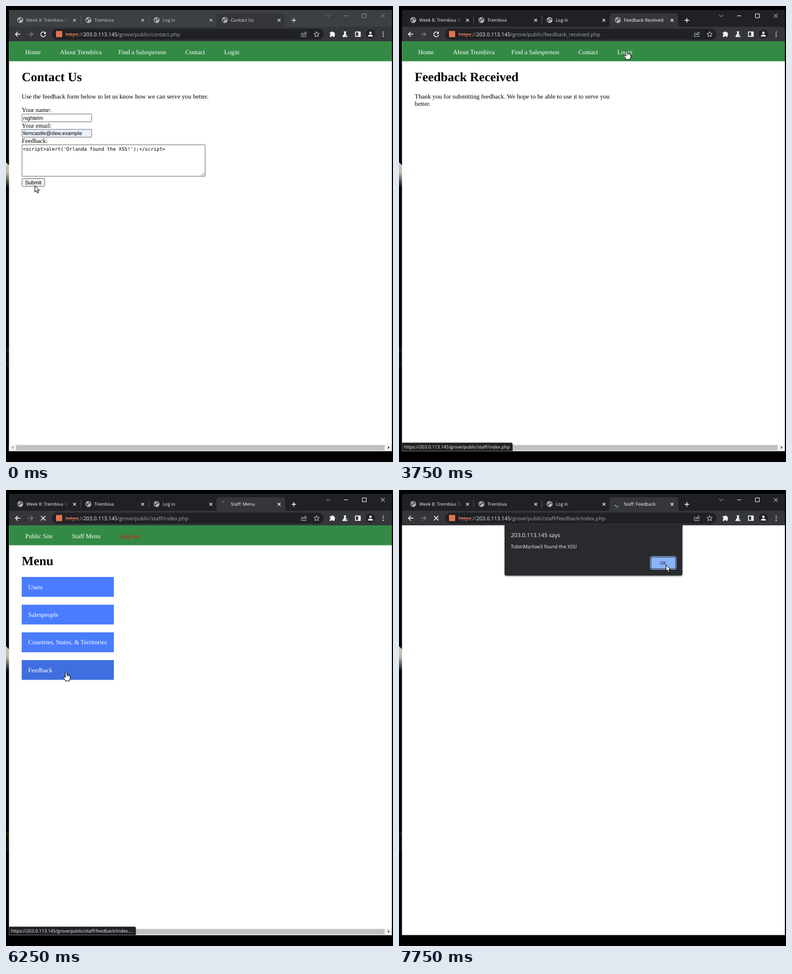
Animation of 689 by 813 pixels, one loop 8000 ms. Source, as an HTML page with a canvas:

```html
<!DOCTYPE html>
<html lang="en">
<head>
<meta charset="utf-8">
<title>Feedback form</title>
<style>
html, body { margin: 0; width: 100%; height: 100%; overflow: hidden; background: #000; }
canvas { display: block; width: 689px; height: 813px; }
</style>
</head>
<body>
<canvas id="stage" width="689" height="813"></canvas>
<script>
const ctx = document.getElementById('stage').getContext('2d');
ctx.textRendering = 'geometricPrecision';

const LOOP = 8000, STEP = 250;
const LEFT = 5.3, WIDTH = 681.7, BOTTOM = 793.4;
const SERIF = '"Liberation Serif", serif';
const SANS = '"Liberation Sans", sans-serif';
const MONO = '"DejaVu Sans Mono", monospace';
const UI = '"Open Sans", sans-serif';

const SCHEME = 'https', HOST = '203.0.113.145', ROOT = '/grove/public/';
const BRAND = 'Trembiva';

const PAGES = [
  { from: 0, title: 'Contact Us', path: 'contact.php', draw: contactPage },
  { from: 1500, title: 'Feedback Received', path: 'feedback_received.php', draw: receivedPage },
  { from: 5250, title: 'Staff: Menu', path: 'staff/index.php', draw: menuPage },
  { from: 6750, title: 'Staff: Feedback', path: 'staff/feedback/index.php', draw: alertPage },
];

// time, x, y of the pointer tip
const POINTER = [
  [0, 51, 320], [1250, 51, 320], [1500, 110, 362], [1750, 211, 402], [2000, 211, 389],
  [2250, 297, 128], [2500, 297, 128], [2750, 350, 100], [3000, 405.5, 79], [4250, 405.5, 79],
  [4500, 414, 92], [4750, 400, 150], [5000, 370, 215], [5250, 363, 225], [5500, 300, 252],
  [5750, 160, 312], [6000, 107, 324], [6500, 107, 324], [6750, 267, 248], [7000, 360, 215],
  [7250, 455, 160], [7500, 477, 141], [7750, 475, 133], [8000, 475, 133],
];

const between = (t, a, b) => t >= a && t < b;

function rect(x, y, w, h, fill, r = 0) {
  ctx.fillStyle = fill;
  ctx.beginPath();
  ctx.roundRect(x, y, w, h, r);
  ctx.fill();
}

function frame(x, y, w, h, fill, stroke, r = 0) {
  rect(x, y, w, h, fill, r);
  ctx.strokeStyle = stroke;
  ctx.lineWidth = 1;
  ctx.beginPath();
  ctx.roundRect(x + .5, y + .5, w - 1, h - 1, r);
  ctx.stroke();
}

function disc(x, y, r, fill) {
  ctx.fillStyle = fill;
  ctx.beginPath();
  ctx.arc(x, y, r, 0, Math.PI * 2);
  ctx.fill();
}

function shape(d, x, y, { fill, stroke, width = 1 }) {
  const path = new Path2D(d);
  ctx.save();
  ctx.translate(x, y);
  ctx.lineJoin = 'round';
  if (fill) { ctx.fillStyle = fill; ctx.fill(path); }
  if (stroke) { ctx.strokeStyle = stroke; ctx.lineWidth = width; ctx.stroke(path); }
  ctx.restore();
}

const line = (d, x, y, stroke, width = 1) => shape(d, x, y, { stroke, width });

function text(str, x, y, size, family, fill, { weight = '', align = 'left' } = {}) {
  ctx.font = `${weight} ${size}px ${family}`;
  ctx.textAlign = align;
  ctx.fillStyle = fill;
  ctx.fillText(str, x, y);
  return x + ctx.measureText(str).width;
}

const body = (str, x, y, fill = '#000') => text(str, x, y, 11.28, SERIF, fill);
const heading = str => text(str, 28, 134, 22.56, SERIF, '#000', { weight: 'bold' });

function gradient(x0, y0, x1, y1, ...stops) {
  const g = ctx.createLinearGradient(x0, y0, x1, y1);
  stops.forEach(([at, color]) => g.addColorStop(at, color));
  return g;
}

function backdrop() {
  rect(0, 0, 689, 813, '#000');
  const glow = gradient(0, 279, 0, 324,
    [0, '#c9c6b6'], [.4, '#bdbaa9'], [.7, '#5f5d54'], [1, '#000']);
  shape('M0 278.5L6 284.5V326H0Z', 0, 0, { fill: glow });
  rect(0, 605, 6, 41, gradient(0, 605, 0, 646,
    [0, '#000'], [.2, '#171b0c'], [.4, '#070904'], [.85, '#10140a'], [1, '#000']));
}

function globe(x) {
  disc(x, 25, 5.2, '#b2b5b9');
  shape('M-3.8-1.5L-1-1 0 1-1.6 2.2-1.4 4.3Q-4 3-4.2 0ZM0-4.2L2.8-3 3.9-.6 1.8.6.6-1.2-.8-2Z', x, 25, { fill: '#494c50' });
}

function spinner(t) {
  const rad = Math.PI / 180;
  let start = 205 - (t - 6250) * .2, sweep = 55, color = '#777a7f';
  if (t >= 6750) {
    const p = t - 6750;
    start = -90 + p * .525;
    sweep = 90 + 135 * Math.abs(Math.cos(Math.PI * p / 666));
    color = '#7ca5e6';
  }
  ctx.strokeStyle = color;
  ctx.lineWidth = 1.4;
  ctx.beginPath();
  ctx.arc(389.5, 25, 5, start * rad, (start + sweep) * rad);
  ctx.stroke();
}

function tabs(t, page, loading) {
  const focused = t >= 250;
  const strip = focused ? '#202124' : '#3c4043';
  const dim = focused ? '#f1f3f4' : '#c4c7ca';
  const bright = focused ? '#fff' : '#dfe1e4';
  const control = focused ? '#f1f3f4' : '#8c9094';
  rect(LEFT, 7, WIDTH, 30, strip);
  shape('M370 37Q375 37 375 32V18Q375 13 380 13H492Q497 13 497 18V32Q497 37 502 37Z', 0, 0, { fill: '#35363a' });

  const titles = [`Week 8: ${BRAND} Targets`, BRAND, 'Log in', page.title];
  titles.forEach((title, i) => {
    const x = 25.3 + i * 121.4;
    const color = i === 3 ? bright : dim;
    if (i === 3 && loading) spinner(t); else globe(x);
    ctx.save();
    ctx.beginPath();
    ctx.rect(x, 14, 87, 22);
    ctx.clip();
    const ink = i === 0 ? gradient(98, 0, 112, 0, [0, color], [1, strip]) : color;
    text(title, x + 10.8, 28.2, 8, UI, ink);
    ctx.restore();
    line('M-2.5-2.5L2.5 2.5M2.5-2.5L-2.5 2.5', x + 96.7, 25.3, color, 1.2);
    if (i < 2) line('M0 0V14', x + 107.5, 18, '#55585c', 1);
  });

  line('M-4 0H4M0-4V4', 512.5, 25.5, bright, 1.3);
  line('M-3.5-1.8L0 1.8 3.5-1.8', 573.5, 17.5, focused ? '#bdc1c6' : '#8c9094');
  line('M-3.5 0H3.5', 605.5, 17.5, control);
  line('M-3.5-3.5H3.5V3.5H-3.5Z', 638, 17.5, control);
  line('M-3.5-3.5L3.5 3.5M3.5-3.5L-3.5 3.5', 670.8, 17.5, control);
}

function toolbar(page, loading) {
  const white = '#f4f5f6', grey = '#a2a7ad';
  rect(LEFT, 37, WIDTH, 26, '#35363a');
  rect(82, 40.5, 483.5, 19.5, '#202124', 9.7);
  line('M4.5 0H-4M0-4.2L-4.2 0 0 4.2', 21, 50.3, white, 1.4);
  line('M-4.5 0H4M0-4.2L4.2 0 0 4.2', 43.5, 50.3, '#7d8085', 1.3);
  if (loading) {
    line('M-4-4L4 4M4-4L-4 4', 66.3, 50.3, white, 1.4);
  } else {
    line('M3.2-2.8A4.3 4.3 0 1 0 4.2 1.2', 66.3, 50.3, white, 1.4);
    shape('M4.6-4.8V-.5H.3Z', 66.3, 50.3, { fill: white });
  }
  rect(89, 44.5, 11, 11, '#e0754f');

  const end = text(SCHEME, 106, 53.6, 9.3, UI, '#e8795a');
  line(`M106 50.5H${end}`, 0, 0, '#e8795a', 1);
  let x = text('://', end, 53.6, 9.3, UI, grey);
  x = text(HOST, x, 53.6, 9.3, UI, white);
  text(ROOT + page.path, x, 53.6, 9.3, UI, grey);

  line('M-2-1.5H-4.5V4.5H3.5V2.5M-2 2Q-1.5-2 2-2V-4.2L5-1 2 2V0Q-.5 0-2 2Z', 530.5, 50, '#bdc1c6', .9);
  line('M0-4.7L1.4-1.5 4.8-1.2 2.2 1 3 4.4 0 2.6-3 4.4-2.2 1-4.8-1.2-1.4-1.5Z', 553, 50.3, '#d2d4d7', 1);
  shape('M-4.5-3.2H-1.6A1.5 1.5 0 0 1 1.4-3.2H4V-.5A1.5 1.5 0 0 1 4 2.3V5H1.2A1.4 1.4 0 0 0-1.6 5H-4.5V2.2A1.4 1.4 0 0 0-4.5-.6Z', 581, 50, { fill: white });
  shape('M-2.4-5H2.4V-3.8H1.5V-1L4.6 4Q4.8 5 4 5H-4Q-4.8 5-4.6 4L-1.5-1V-3.8H-2.4Z', 603.5, 50.3, { fill: white });
  shape('M.6.8H2.4L4.2 4H1.4Z', 603.5, 50.3, { fill: '#6ea3e8' });
  rect(621.5, 45.5, 10, 9.5, white, 1);
  rect(623, 47, 4, 6.5, '#35363a');
  disc(648.8, 50, 8, '#202124');
  disc(648.8, 47.7, 2.2, white);
  shape('M-4.3 4.5V3.2Q-4 1 0 1T4.3 3.2V4.5Z', 648.8, 50, { fill: white });
  for (const dy of [-3.8, 0, 3.8]) disc(671.5, 50.3 + dy, 1.05, white);
}

function scrollbar() {
  rect(LEFT, 782, WIDTH, BOTTOM - 782, '#f1f1f1');
  rect(18, 782.7, 656, 9.6, '#c1c1c1');
  shape('M1.5-2.5V2.5L-1.5 0Z', 11.5, 787.3, { fill: '#a3a3a3' });
  shape('M-1.5-2.5V2.5L1.5 0Z', 681.5, 787.3, { fill: '#404040' });
}

function navBar(items) {
  rect(LEFT, 63, WIDTH, 35.6, '#338a45');
  for (const [label, x, color = '#fff'] of items) body(label, x, 85.7, color);
}

const publicNav = () => navBar([
  ['Home', 34.2], [`About ${BRAND}`, 96], ['Find a Salesperson', 200], ['Contact', 319.3], ['Login', 388.5],
]);

function contactPage() {
  publicNav();
  heading('Contact Us');
  body('Use the feedback form below to let us know how we can serve you better.', 28, 165.3);
  body('Your name:', 28, 189.3);
  frame(28, 192, 125, 15, '#fff', '#767676', 1);
  text('nightelm', 30.5, 202.6, 9.4, SANS, '#000');
  body('Your email:', 28, 216.8);
  frame(28, 219.5, 125, 15, '#e8f0fe', '#767676', 1);
  text('ferncastle@dew.example', 30.5, 230.2, 9.4, SANS, '#000');
  body('Feedback:', 28, 244.3);
  frame(28, 247, 327, 57, '#fff', '#767676');
  text("<script>alert('Orlanda found the XSS!');<\/script>", 30, 258, 8.6, MONO, '#000');
  line('M-6 0L0-6M-3 0L0-3', 353.5, 302.5, '#777', .8);
  frame(28, 307, 41.5, 15, '#efefef', '#767676', 2);
  text('Submit', 48.6, 317.8, 9.4, SANS, '#000', { align: 'center' });
}

function receivedPage() {
  publicNav();
  heading('Feedback Received');
  body('Thank you for submitting feedback. We hope to be able to use it to serve you', 28, 165.3);
  body('better.', 28, 178.2);
}

function menuPage(t) {
  navBar([['Public Site', 34.2], ['Staff Menu', 117.5], ['Log out', 202.3, '#f20d0d']]);
  heading('Menu');
  ['Users', 'Salespeople', 'Countries, States, & Territories', 'Feedback'].forEach((label, i) => {
    const y = 155 + i * 49.4;
    rect(28, y, 164, 35.4, i === 3 && t >= 5750 ? '#3f6ee0' : '#497cff');
    body(label, 39.5, y + 21.6, '#fff');
  });
}

function alertPage() {
  ctx.save();
  ctx.shadowColor = 'rgba(0,0,0,.5)';
  ctx.shadowBlur = 3;
  ctx.shadowOffsetY = 1;
  rect(188, 63, 316.5, 89.5, '#292a2d', [0, 0, 3, 3]);
  ctx.restore();
  rect(188, 61, 316.5, 5, '#292a2d');
  text(`${HOST} says`, 199.3, 84, 10, UI, '#f4f5f6');
  text('TobinMarlow3 found the XSS!', 199.3, 103.6, 8.6, UI, '#f4f5f6');
  frame(447, 118, 47, 24, '#202c44', '#a9c7f7', 3);
  rect(449, 120, 43, 20, '#8ab4f8', 2);
  text('OK', 469.8, 132.5, 8, UI, '#111214', { align: 'center' });
}

function statusBubble(t) {
  const staff = between(t, 3250, 5500), feedback = between(t, 6000, 7000);
  if (!staff && !feedback) return;
  const width = staff ? 197 : 226;
  const file = staff ? 'staff/index.php' : 'staff/feedback/index....';
  const fading = t >= 6750;
  rect(LEFT, 778.5, width, BOTTOM - 778.5, fading ? '#c0c0c1' : '#202124', [0, 3, 0, 0]);
  text(`${SCHEME}://${HOST}${ROOT}${file}`, 9, 789.3, 8, UI, fading ? '#fff' : '#f4f5f6');
}

function pointer(t) {
  const i = POINTER.findIndex(k => k[0] > t);
  const [t0, x0, y0] = POINTER[i - 1], [t1, x1, y1] = POINTER[i];
  const p = (t - t0) / (t1 - t0);
  const x = x0 + (x1 - x0) * p, y = y0 + (y1 - y0) * p;
  const look = { fill: '#fff', stroke: '#000', width: 1 };
  if (between(t, 3000, 4750) || between(t, 5750, 6750)) {
    shape('M-1.5 1.2Q0-.6 1.3 1.2V6L3 5.6 4.5 6.3 6 6.4 7.4 7.8V12L6 14.5V16.5H-1.5V15L-5 10.5Q-5 8.2-3 9L-1.5 10.5Z', x, y, look);
    line('M1.3 6V9M3.6 6.4V9M5.7 7V9.3', x, y, '#000', .6);
  } else {
    shape('M.4.5V11.8L3 9.4 4.9 13.5 6.8 12.7 5 8.7H8.6Z', x, y, look);
  }
}

function draw(time) {
  const t = Math.floor((time % LOOP) / STEP) * STEP;
  const page = PAGES.findLast(p => p.from <= t);
  const loading = between(t, 1000, 1500) || between(t, 4250, 5250) || t >= 6250;
  backdrop();
  rect(LEFT, 63, WIDTH, BOTTOM - 63, '#fff');
  tabs(t, page, loading);
  toolbar(page, loading);
  if (page.draw !== alertPage) scrollbar();
  page.draw(t);
  statusBubble(t);
  pointer(t);
}

const began = performance.now();
function tick() {
  draw(performance.now() - began);
  requestAnimationFrame(tick);
}
tick();
</script>
</body>
</html>
```
